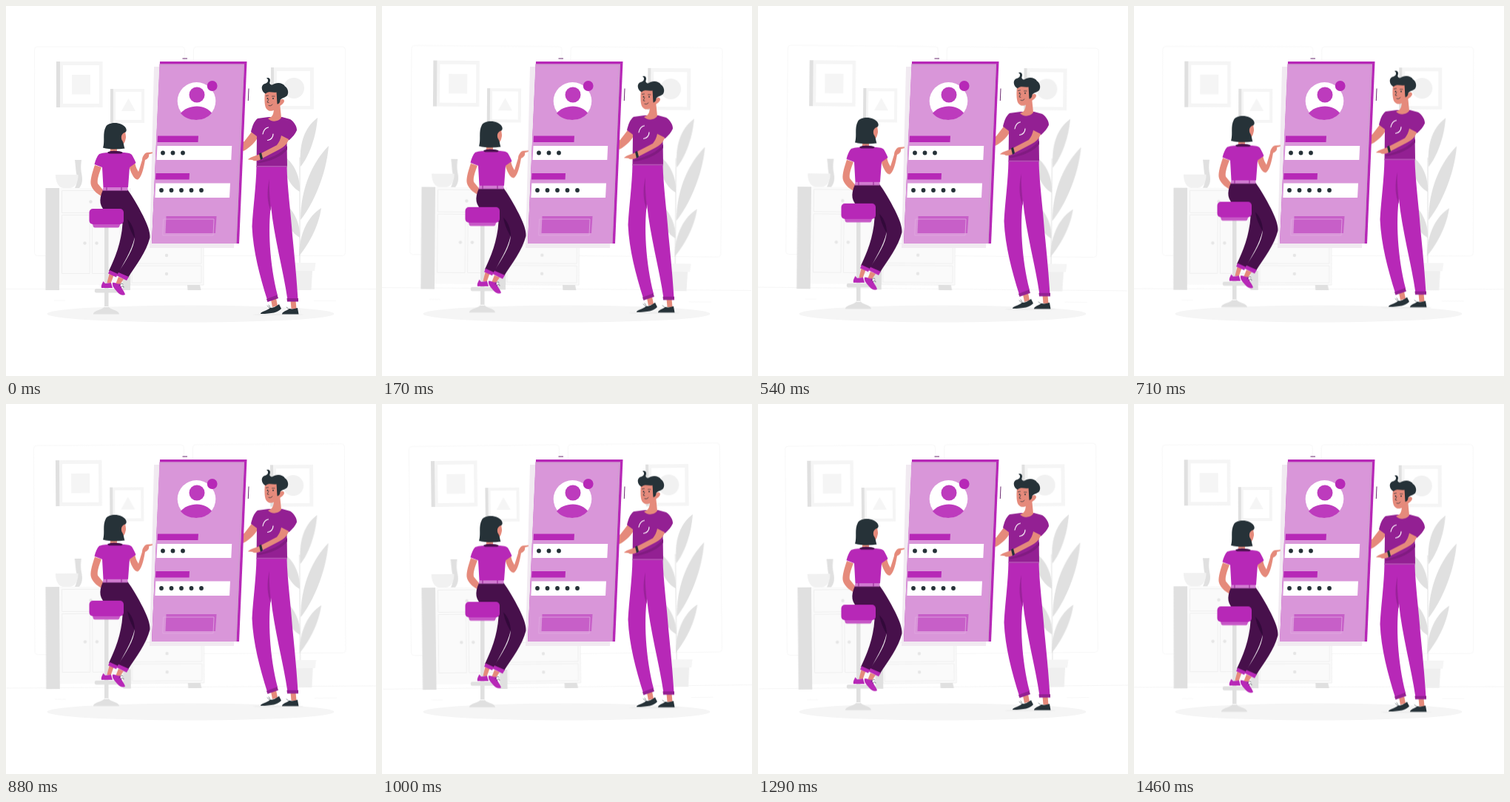
These frames come from a looping animation (500x500 px, 1500 ms). An HTML page:

```html
<!DOCTYPE html>
<html lang="en">
<head>
<meta charset="utf-8">
<title>Login scene</title>
<style>
  html, body { margin: 0; width: 100%; height: 100%; overflow: hidden; background: #fff; }
  svg { display: block; width: 100vw; height: 100vh; }
  #room { transform-origin: 250px 250px; }
  .main { fill: #b728b7; }
  .deep { fill: #932093; }
  .night { fill: #47104b; }
  .ink { fill: #263238; }
  .skin { fill: #e58a7b; }
  .g1 { fill: #fafafa; }
  .g2 { fill: #f5f5f5; }
  .g3 { fill: #e0e0e0; }
  .white { fill: #fff; }
  .line { fill: none; stroke-linecap: round; stroke-linejoin: round; }
</style>
</head>
<body>
<svg viewBox="0 0 500 500" xmlns="http://www.w3.org/2000/svg">
  <g id="room">
    <g fill="none" stroke="#f5f5f5" stroke-width=".8">
      <rect x="38.5" y="55" width="203" height="282.5" rx="4"/>
      <rect x="253.5" y="55" width="205" height="282.5" rx="4"/>
    </g>
    <path d="M0 382.4H500" stroke="#ececec" stroke-width=".6"/>
    <path d="M65 398H80M416 398.5H446" stroke="#f3f3f3" stroke-width=".6"/>

    <!-- wall frames -->
    <path class="g3" d="M68 75h6v62h-6zM141 112h5v46h-5zM358 83h5v56.500h-5z"/>
    <path class="g2" d="M73 75h57.500v62H73zM145 112h42v46h-42zM362 83h54v56.500h-54z"/>
    <path class="white" d="M77 80h49v52H77zM148 116h35v38h-35zM366 88h45v47h-45z"/>
    <path class="g2" d="M89 93h25v26.500H89zM156 142l9.500-17 9.500 17z"/>
    <circle cx="389" cy="111" r="14" fill="#f1f1f1"/>

    <!-- cabinet -->
    <path class="g1" d="M72 246H168V321H267V377H72z"/>
    <g fill="none" stroke="#ececec" stroke-width=".8">
      <path d="M75.500 249.500h77v30h-77zM75.500 282.500h37.500v79H75.500zM116.500 282.500h38v79h-38z"/>
      <path d="M170 321.500h94v26.500h-94zM170 351h94v23h-94zM168 246v131h99V321"/>
    </g>
    <path class="g3" d="M53.500 246H72V384H53.500zM245 377h17l1.500 7h-18zM157.500 358H168V384H157.500z"/>
    <g fill="#e6e6e6">
      <circle cx="114.500" cy="264.500" r="2.200"/><circle cx="106.500" cy="320.500" r="2.200"/>
      <circle cx="122.500" cy="320.500" r="2.200"/><circle cx="217" cy="337" r="2.200"/>
      <circle cx="217" cy="362" r="2.200"/>
    </g>
    <path class="g3" d="M93 208h9c-1 8-1 12 0 18 2 9 1 15-3 20h-6c3-5 4-13 2-20-1-6-1-11-2-18z"/>
    <path d="M67 228H97.500C98 238 93 246 86 246H78C71 246 67 238 67 228z" fill="#f1f1f1"/>

    <!-- plant -->
    <path class="line" d="M397 205V348" stroke="#e0e0e0"/>
    <g class="g3">
      <path d="M421 151C401 166 396 190 398 217C409 204 419 178 421 151z"/>
      <path d="M436 189C414 211 398 247 398 289C414 270 433 228 436 189z"/>
      <path d="M426 273C408 284 396 308 396 338C408 323 422 300 426 273z"/>
      <path d="M374 201C389 212 398 230 397 251C382 243 374 222 374 201z"/>
      <path d="M374 265C388 274 398 293 397 313C383 305 375 286 374 265z"/>
    </g>
    <path class="g2" d="M387 347h31.500l-1.500 11h-29z"/>
    <path d="M389 358h25l-1.500 26h-21z" fill="#efefef"/>
  </g>

  <ellipse cx="249.500" cy="416" rx="194" ry="11.500" class="g2"/>

  <g id="man">
    <ellipse cx="368" cy="417" rx="34" ry="1.200" fill="#ededed"/>
    <path class="skin" d="M332 170L341 176C337 184 331 190 322 195.500L312 197V187L322 183z"/>
    <path class="skin" d="M358 397L365 395 367 405 360 407zM384.500 398h7l1 11h-7z"/>
    <path class="ink" d="M344 416C344 413 350 413 357 408C361 408 365 406 369 403L372 409C367 414 360 416 344 416z"/>
    <path class="ink" d="M373 416.500C373 413 379 412 383 409C387 410 390 409 394 408L395.500 416.500z"/>
    <path class="line" d="M353 405l4 4M355 404l3 5M379 407l4 3" stroke="#263238" stroke-width=".5"/>
    <path class="main" d="M338.500 216H379.500C380 245 385 280 387 310C390 340 393 370 394.500 397H380.500C375 358 362 312 358 270C354 300 356 348 367 391L353 397C343 365 334 332 332.500 298C334 270 338 245 338.500 216z"/>
    <path d="M356 234C352 250 353 267 358 277C357 260 355 249 356 234z" fill="#9a229a"/>
    <path class="deep" d="M352 396L366.500 390.500 368 395 353.500 400zM379.500 395H395V399.500H380z"/>
    <path class="deep" d="M340 152L355 150H373L384 153C390 157 393 163 393 168C391 173 387 177 383 181L379.500 182L380 217.500H338.500L339 176L331 170C333 162 335 156 340 152z"/>
    <path d="M340 210.500C357 206 372 200 380 189V194C372 204 357 210 340 212.500z" fill="#811b81"/>
    <path d="M338.500 216.800H380" stroke="#d07ad0" stroke-width=".9"/>
    <path class="line" d="M347 173C348 168 350 165 354.500 164M353.500 181.500C358 181 361 177.500 361 173" stroke="#fff" stroke-width="1.200"/>
    <path class="skin" d="M372 175L382 180C380 187 375 191 369 194L346 206C341 210 335 210 333 208L327 207.500C329 205 335 203 341 201L366 188C369 184 371 180 372 175z"/>
    <path class="ink" d="M342 199.500L345 198 347 206 344 208z"/>
    <path class="skin" d="M362 136L370 131 372 151C368 157 358 157 354 152C361 150 362 145 362 136z"/>
    <path class="skin" d="M350 116C349 126 349 137 353 140C357 144 364 141 367 136C372 135 376 131 376 128C375 125 371 126 369 128V115z"/>
    <path class="ink" d="M351 118.500C345 116 344 108 348.500 105.500C352 104.500 354.500 103 354 100C354 99 353 98 352 97.500C356 96 358 99 356.500 103C356 105 357 106.500 360 106.500C365 102.500 374 103 377 108.500C381 111 382.500 117 380 121C377 124 373 124 370.500 127C370.500 130 369 132.500 366.500 132.500C366 127 366 121 365.500 116.500C360 117.500 355 114.500 351 118.500z"/>
    <path class="line" d="M351.500 121.500l3-.5M359.500 122h3.500M355 126l-2 4 2 .5M355 134.500c2 1 4 0 5-1.500" stroke="#263238" stroke-width=".7"/>
    <circle class="ink" cx="353.500" cy="125" r=".9"/><circle class="ink" cx="361" cy="125" r=".9"/>
  </g>

  <g id="device">
    <path d="M200 82H322L308 327H194z" fill="#f1eaf1"/>
    <path class="main" d="M208 75H325.500L315 321H197z"/>
    <path d="M207.500 78.500H322L311.500 321H197z" fill="#d996d9"/>
    <path d="M207.500 78.500H322L311.500 321H309L319.500 81.500H207.300z" fill="#cf9dcf" opacity=".6"/>
    <path d="M238.500 71H245M328 111.500L327.300 128" stroke="#6b2a70"/>
    <ellipse class="white" cx="257.500" cy="128.500" rx="25.800" ry="25.500"/>
    <g fill="#bd3bbd">
      <circle cx="258" cy="120" r="10.500"/>
      <path d="M236 145C241 139 249 135.500 258 135.500S273 139 278 144.500C273 151 265 154 257 154S241 151 236 145z"/>
    </g>
    <circle class="main" cx="278.700" cy="108" r="6.900"/>
    <path class="main" d="M205 175.500H260L259.500 184H204.600zM202.500 226H248L247.600 234.500H202z"/>
    <path class="white" d="M204.500 189H305.200L304.300 208H203.500zM202.300 239.500H303L302 259H201.400z"/>
    <g id="dots" class="ink"></g>
    <path d="M216.500 284H284.500L283 307H215.500z" fill="#c75fc8"/>
    <path d="M212.700 288H281L280 310H211.700z" fill="none" stroke="#e0a9e0" stroke-width=".8"/>
  </g>

  <g id="woman">
    <path class="g3" d="M133 297h5.500v110h-5.500zM122 382h28c3 0 3 5.500 0 5.500h-28c-3 0-3-5.500 0-5.500zM133 406C131 411 118 411 118 416.500H153C153 411 141 411 138.500 406z"/>
    <path class="skin" d="M120 215L129 218C125 228 123 235 124 240L133 251 131 258C122 254 115 246 114.500 240C114 233 117 224 120 215z"/>
    <path class="skin" d="M166 216L174 211C175 217 177 221 179 224L184 208C184 203 188 198 191 198L198 197.500V199L193 200.500C194 204 191 207 188 208C186 219 184 229 179 234C174 237 169 226 166 216z"/>
    <path class="skin" d="M139.500 362l6 2-4 11-5-1zM152 366l7 3-6 9-5-2z"/>
    <path class="main" d="M131.500 372L134 375 142 374 144 381H129C128 378 130 375 131.500 372zM144 374C147 373 151 377 154 375C155 381 160 385 161 390C158 392 153 390 150 386C147 382 143 379 144 374z"/>
    <path class="line" d="M153 378c2-3 4-4 5-2M155 380c2-2 4-2 4 0" stroke="#263238" stroke-width=".6"/>
    <path class="night" d="M131 248.500H164.500C170 256 179 271 185 283C191 295 195 305 194.500 313C190 332 175 351 165 367L152 360.500C162 343 173 329 174 312C170 332 158 348 150.500 364L139 358C147 341 156 320 157.500 294L137 279C126 272 125 262 131 248.500z"/>
    <path d="M164 288C170 294 174 303 174 314C170 307 166 299 164 288z" fill="#32093a"/>
    <path class="main" d="M140 357L151 362 149 366.500 138 361.500zM152 360L166 366 163 371 150 364.500z"/>
    <path class="main" d="M126 200C132 198 138 198 143 198H155C161 198 167 198 170 201C172 204 174 208 175.500 212L167 218 165 245H131.500L130 218L119.500 214C121 208 123 203 126 200z"/>
    <path d="M131.500 245H164.500V249.500H130.500z" fill="#d17bd1"/>
    <path d="M136 245v4.500M156 245v4.500" stroke="#8f208f"/>
    <path class="skin" d="M141 190h9v7h-9z"/>
    <path class="night" d="M137 198C139 195 154 195 158 198L156 199.500H139z"/>
    <path class="skin" d="M154 168H161C161 172 162.500 176 162 178C161 183 160 187 156 187.500z"/>
    <path class="ink" d="M131 191.500C134 182 130 172 135 163C139 156 157 156 162 165C163.500 168 162.500 170.500 160 171C156 173 155 177 156.500 181C159.500 185 159 189 160.500 192.500C151 194 140 194 131 191.500z"/>
    <path d="M117 293H155L153 298.500Q152.500 299.500 151 299.500H120Q118 299.500 117.500 297z" fill="#c657c6"/>
    <rect class="main" x="112.500" y="274" width="46.500" height="21" rx="5"/>
  </g>
</svg>
<script>
  const $ = id => document.getElementById(id);
  const loop = (id, steps) => $(id).animate(steps, { duration: 1500, iterations: Infinity }).startTime = 0;
  const turn = (deg, offset) => ({ transform: `rotate(${deg}deg)`, offset });
  const lift = y => ({ transform: `translateY(${y}px)` });

  const dotRow = (x, y, n) => Array.from({ length: n }, (_, i) =>
    `<circle cx="${x + 13.5 * i}" cy="${y}" r="2.9"/>`).join('');
  $('dots').innerHTML = dotRow(212, 198.5, 3) + dotRow(210, 249, 5);

  loop('room', [turn(0, 0), turn(1, .25), turn(-1, .75), turn(0, 1)]);
  for (const id of ['man', 'woman']) loop(id, [lift(0), lift(-10), lift(0)]);
</script>
</body>
</html>
```
